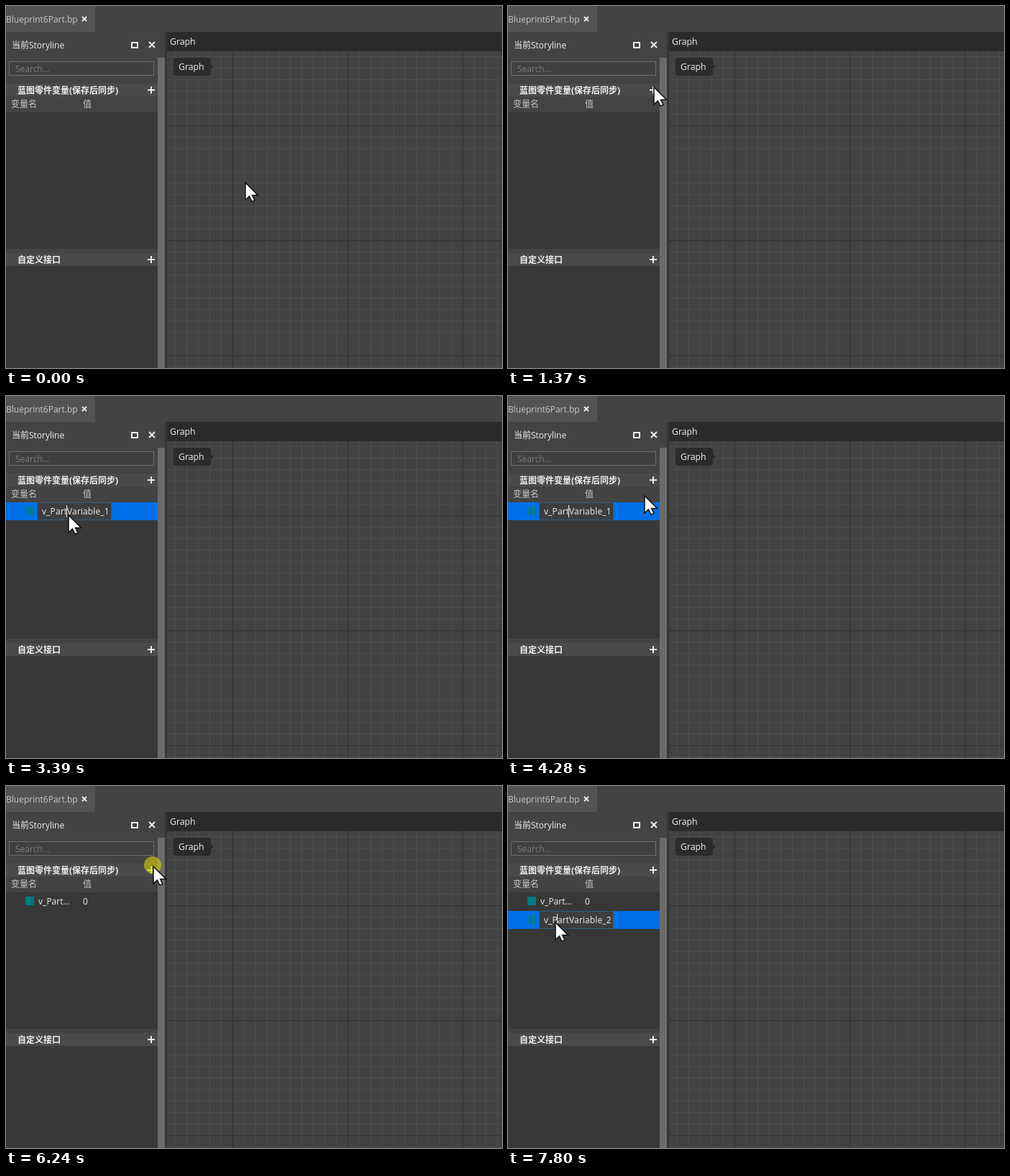
These frames come from a looping animation (690x504 px, 8000 ms). An HTML page:

```html
<!DOCTYPE html>
<html lang="zh">
<head>
<meta charset="utf-8">
<title>Variable panel</title>
<style>
html, body { margin: 0; width: 100%; height: 100%; overflow: hidden; background: #424242; }
svg { display: block; width: 690px; height: 504px; }
text { font: 12px "Open Sans", "Noto Sans CJK SC", "Noto Sans CJK", "Noto Sans", sans-serif; fill: #f0f0f0; white-space: pre; }
.bold { font-weight: 700; }
.dim { fill: #c8c8c8; }
.wide { letter-spacing: .11px; }
.icon { fill: none; stroke: #eee; stroke-width: 2; }

/* Every part shares one 8 s timeline; 1% is 80 ms. */
.anim { animation: 8s step-end -5ms infinite; }
#cursor { animation-name: move; }
#click { animation-name: click; }
#caret { animation-name: caret; }
#focus, #picked1 { animation-name: picked1; }
#edit1 { animation-name: edit1; }
#done1 { animation-name: done1; }
#edit2 { animation-name: edit2; }
#picked2 { animation-name: picked2; }

@keyframes move {
  0% { transform: translate(333px, 246px); }
  4.125% { transform: translate(333px, 246px); animation-timing-function: steps(4, jump-start); }
  7.625% { transform: translate(275px, 185px); animation-timing-function: steps(4, jump-start); }
  11.125% { transform: translate(222px, 122px); animation-timing-function: steps(4, jump-start); }
  14.625% { transform: translate(209px, 106px); }
  15.375% { transform: translate(209px, 106px); animation-timing-function: steps(3, jump-start); }
  18% { transform: translate(203px, 113px); }
  33.75% { transform: translate(157px, 133px); }
  34.625% { transform: translate(157px, 133px); animation-timing-function: steps(3, jump-start); }
  37.25% { transform: translate(103px, 158px); animation-timing-function: steps(3, jump-start); }
  39.875% { transform: translate(87px, 166px); }
  43.125% { transform: translate(87px, 166px); animation-timing-function: steps(5, jump-start); }
  47.5% { transform: translate(62px, 165px); }
  49.125% { transform: translate(62px, 165px); animation-timing-function: steps(6, jump-start); }
  54.375% { transform: translate(190px, 139px); }
  55.125% { transform: translate(190px, 139px); animation-timing-function: steps(4, jump-start); }
  58.625% { transform: translate(190px, 197px); }
  62.75% { transform: translate(190px, 197px); animation-timing-function: steps(3, jump-start); }
  65.375% { transform: translate(204px, 161px); animation-timing-function: steps(3, jump-start); }
  68% { transform: translate(214px, 134px); animation-timing-function: steps(4, jump-start); }
  71.5% { transform: translate(205px, 112px); }
  86.25% { transform: translate(205px, 112px); animation-timing-function: steps(4, jump-start); }
  89.75% { transform: translate(160px, 128px); animation-timing-function: steps(4, jump-start); }
  93.25% { transform: translate(86px, 176px); animation-timing-function: steps(3, jump-start); }
  95.875%, 100% { transform: translate(66px, 190px); }
}
@keyframes click {
  0%, 22.125%, 42.375%, 62.75%, 80.5%, 97.5%, 100% { opacity: 0; }
  20.375%, 41.5%, 61.875%, 78%, 96.625% { opacity: .61; }
}
@keyframes caret {
  0% { opacity: 0; transform: translate(144px, 152px); }
  21.25%, 35.375% { opacity: 1; transform: translate(144px, 152px); }
  28.75%, 42% { opacity: 0; transform: translate(144px, 152px); }
  42.375%, 49.75% { opacity: 1; transform: translate(84px, 152px); }
  43.125%, 56.375% { opacity: 0; transform: translate(84px, 152px); }
  79.625%, 93.75% { opacity: 1; transform: translate(144px, 178px); }
  87.125%, 96.625% { opacity: 0; transform: translate(144px, 178px); }
  97.5%, 100% { opacity: 1; transform: translate(68px, 178px); }
}
@keyframes picked1 { 0%, 42.375%, 100% { opacity: 0; } 21.25% { opacity: 1; } }
@keyframes edit1 { 0%, 62.75%, 100% { opacity: 0; } 21.25% { opacity: 1; } }
@keyframes done1 { 0% { opacity: 0; } 62.75%, 100% { opacity: 1; } }
@keyframes edit2 { 0% { opacity: 0; } 79.625%, 100% { opacity: 1; } }
@keyframes picked2 { 0%, 97.5%, 100% { opacity: 0; } 79.625% { opacity: 1; } }
</style>
</head>
<body>
<svg viewBox="0 0 690 504">
  <defs>
    <pattern id="minor" x="235" y="70" width="16" height="16" patternUnits="userSpaceOnUse">
      <path d="M.5 0V16M0 .5H16" stroke="#4d4d4d"/>
    </pattern>
    <pattern id="major" x="315" y="166" width="160" height="160" patternUnits="userSpaceOnUse">
      <path d="M.5 0V160M0 .5H160" stroke="#343434" stroke-width="1.5"/>
    </pattern>
    <path id="plus" class="icon" d="M-5 0H5M0-5V5"/>
    <g id="field">
      <rect y="148" width="211" height="25" fill="#0070e8"/>
      <rect x="27" y="154" width="12" height="12" fill="#00799c"/>
      <rect x="43.5" y="148.5" width="103" height="24" fill="#3d3d3d" stroke="#2d6084"/>
    </g>
    <g id="picked">
      <path d="M0 148H43V173H0ZM147 148H211V173H147ZM50 152H144V169H50Z" fill="#0078d7"/>
      <rect x="27" y="154" width="12" height="12" fill="#00799c"/>
    </g>
  </defs>

  <!-- tab bar -->
  <rect width="690" height="504" fill="#434343"/>
  <rect width="124" height="36" fill="#535353"/>
  <text x="0" y="23" class="dim">Blueprint6Part.bp</text>
  <path class="icon" d="M106 15l6 6m0-6l-6 6"/>

  <!-- graph view -->
  <rect x="221" y="36" width="3" height="468" fill="#363636"/>
  <rect x="224" y="63" width="466" height="441" fill="#424242"/>
  <rect x="224" y="63" width="466" height="441" fill="url(#minor)"/>
  <rect x="224" y="63" width="466" height="441" fill="url(#major)"/>
  <rect x="224" y="36" width="466" height="27" fill="#2b2b2b"/>
  <text x="228" y="54" style="font-size:12.3px">Graph</text>
  <rect x="233" y="72" width="52" height="25" rx="4" fill="#2b2b2b"/>
  <path d="M284 80l5 4.5l-5 4.5z" fill="#2b2b2b"/>
  <text x="240" y="89" style="font-size:12.3px">Graph</text>

  <!-- side panel -->
  <text x="8" y="59">当前Storyline</text>
  <rect class="icon" x="175" y="51" width="8" height="7"/>
  <path class="icon" d="M199 50l8 8m0-8l-8 8"/>
  <rect x="4.5" y="77.5" width="201" height="19" fill="#3f3f3f" stroke="#6c6c6c"/>
  <text x="13" y="92" style="fill:#7e7e7e">Search...</text>
  <rect y="108" width="211" height="18" fill="#4a4a4a"/>
  <rect y="148" width="211" height="190" fill="#383838"/>
  <rect y="344" width="211" height="18" fill="#4a4a4a"/>
  <rect y="362" width="211" height="142" fill="#383838"/>
  <rect x="211" y="72" width="10" height="432" fill="#6b6b6b"/>
  <text x="16" y="122" class="bold">蓝图零件变量(保存后同步)</text>
  <text x="7" y="141" class="dim">变量名</text>
  <text x="107" y="141" class="dim">值</text>
  <text x="16" y="358" class="bold">自定义接口</text>
  <rect id="focus" class="anim" x="196" y="111" width="12" height="13" fill="#283c6c"/>
  <use href="#plus" x="202" y="117"/>
  <use href="#plus" x="202" y="353"/>

  <!-- variable rows -->
  <g id="edit1" class="anim">
    <use href="#field"/>
    <use id="picked1" class="anim" href="#picked"/>
    <text x="50" y="165" class="wide">v_PartVariable_1</text>
  </g>
  <g id="done1" class="anim">
    <rect x="27" y="154" width="12" height="12" fill="#007a80"/>
    <text x="45" y="165">v_Part...</text>
    <text x="107" y="165">0</text>
  </g>
  <g id="edit2" class="anim">
    <use href="#field" y="26"/>
    <g id="picked2" class="anim"><use href="#picked" y="26"/></g>
    <text x="50" y="191" class="wide">v_PartVariable_2</text>
  </g>
  <rect id="caret" class="anim" width="1" height="17" fill="#f0f0f0"/>

  <g id="cursor" class="anim">
    <circle id="click" class="anim" cx="-1" cy="-2" r="12" fill="#dad105"/>
    <path d="M0 0V24L5.4 19L9 26.3L13 24.5L9.6 17.5H17.5Z" fill="#fff" stroke="#111" stroke-width="1.5"/>
  </g>
</svg>
</body>
</html>
```
